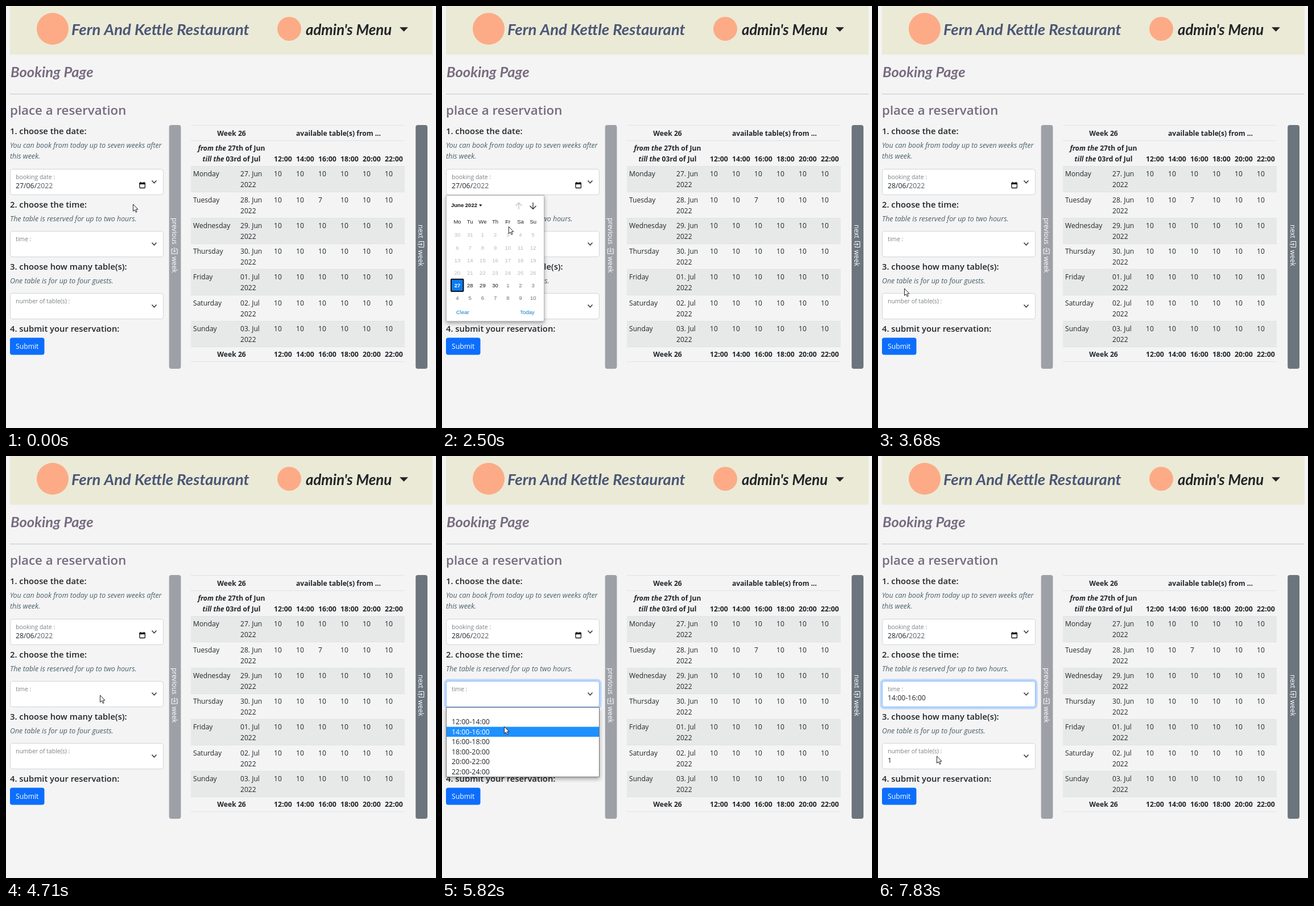
Write an HTML page with a canvas that moves like this. It is 756 px wide and 741 px high and loops after 8000 ms.

```html
<!DOCTYPE html>
<html lang="en">
<head>
<meta charset="utf-8">
<title>Booking Page</title>
<style>
  html, body { margin: 0; width: 100%; height: 100%; overflow: hidden; background: #f4f4f4; }
  canvas { display: block; width: 756px; height: 741px; }
</style>
</head>
<body>
<canvas id="stage" width="756" height="741"></canvas>
<script>
const ctx = document.getElementById('stage').getContext('2d');
const LOOP = 8000;
const UI = '"Open Sans", "Noto Sans", sans-serif';
const TITLE = 'Lato, "Open Sans", sans-serif';
const PICKER = '"Liberation Sans", Arial, sans-serif';
const INK = '#212529', MAUVE = '#776b80', TEAL = '#49606c';
const COLS = [471, 510, 549, 588, 627, 666];
const HOURS = ['12:00', '14:00', '16:00', '18:00', '20:00', '22:00'];
const DAYS = ['Monday', 'Tuesday', 'Wednesday', 'Thursday', 'Friday', 'Saturday', 'Sunday'];

// Moments of the hard changes, in ms
const PICKER_OPEN = 1950, PICKER_CLOSE = 3550, MENU_OPEN = 4850, MENU_CLOSE = 6810;
const CLICKS = [[1880, PICKER_OPEN], [3480, PICKER_CLOSE], [4780, MENU_OPEN], [6680, MENU_CLOSE]];

// Pointer path: time, x, y
const PATH = [
  [540, 223, 348], [760, 236, 330], [980, 249, 315], [1280, 246, 311],
  [1400, 246, 311], [1410, 245, 311], [1600, 245, 312], [1610, 242, 314],
  [2170, 242, 314], [2340, 176, 346], [2500, 117, 387], [2700, 74, 442],
  [2990, 39, 493], [3060, 40, 494], [3280, 46, 496],
  [3690, 46, 496], [3900, 110, 470], [4230, 180, 440], [4500, 165, 420],
  [5080, 165, 420], [5300, 141, 437], [5540, 118, 456], [5820, 109, 475],
  [6800, 109, 475], [6810, 105, 470], [7300, 105, 470], [7560, 99, 496], [7830, 103, 527]
];

function pointerAt(t) {
  const i = PATH.findIndex(k => k[0] > t);
  if (i === 0) return PATH[0].slice(1);
  if (i < 0) return PATH[PATH.length - 1].slice(1);
  const [t0, x0, y0] = PATH[i - 1], [t1, x1, y1] = PATH[i];
  const f = (t - t0) / (t1 - t0);
  return [x0 + (x1 - x0) * f, y0 + (y1 - y0) * f];
}

// Draws one run of text and returns its width
function text(s, x, y, size, color = INK, style = '', align = 'left', family = UI) {
  ctx.font = `${style} ${size}px ${family}`;
  ctx.fillStyle = color;
  ctx.textAlign = align;
  ctx.fillText(s, x, y);
  return ctx.measureText(s).width;
}

function rect(x, y, w, h, color) {
  ctx.fillStyle = color;
  ctx.fillRect(x, y, w, h);
}

function box(x, y, w, h, r, fill, stroke, width = 1) {
  ctx.beginPath();
  ctx.roundRect(x, y, w, h, r);
  if (fill) { ctx.fillStyle = fill; ctx.fill(); }
  if (stroke) { ctx.strokeStyle = stroke; ctx.lineWidth = width; ctx.stroke(); }
}

function line(points, color, width = 1) {
  ctx.beginPath();
  points.forEach(([x, y]) => ctx.lineTo(x, y));
  ctx.strokeStyle = color;
  ctx.lineWidth = width;
  ctx.stroke();
}

function shape(points, color) {
  ctx.beginPath();
  points.forEach(([x, y]) => ctx.lineTo(x, y));
  ctx.closePath();
  ctx.fillStyle = color;
  ctx.fill();
}

function disc(x, y, r, color) {
  ctx.beginPath();
  ctx.arc(x, y, r, 0, Math.PI * 2);
  ctx.fillStyle = color;
  ctx.fill();
}

function panel(x, y, w, h, border) {
  ctx.save();
  ctx.shadowColor = 'rgba(0,0,0,.35)';
  ctx.shadowBlur = 7;
  ctx.shadowOffsetY = 3;
  rect(x, y, w, h, '#fff');
  ctx.restore();
  box(x + .5, y + .5, w - 1, h - 1, 0, null, border);
}

function header() {
  rect(7, 0, 743, 85.5, '#ebead6');
  disc(82, 40, 28, '#fcab86');
  disc(498, 40, 21, '#fcab86');
  text('Fern And Kettle Restaurant', 115, 51, 27.5, '#4a5677', 'italic bold', 'left', TITLE);
  text("admin's Menu", 527, 51, 25.8, INK, 'italic bold', 'left', TITLE);
  shape([[692, 37.3], [707, 37.3], [699.5, 45]], INK);
  text('Booking Page', 8, 125, 25.5, MAUVE, 'italic bold', 'left', TITLE);
  rect(7, 154, 743, 1, '#c6c6c7');
  text('place a reservation', 7, 191, 22.3, MAUVE, '600');
}

function field(y, label, focus) {
  if (focus) box(5.5, y - 1.5, 273, 49, 6, null, '#bcd6fb', 4);
  box(7.5, y + .5, 269, 45, 4, '#fff', focus ? '#86b7fe' : '#d0d4d8');
  text(label, 17, y + 18, 10.45, '#7c8186');
  line([[256.5, y + 20.5], [260.5, y + 24.8], [264.5, y + 20.5]], '#343a40', 1.5);
}

function form(t) {
  text('1. choose the date:', 7, 225, 14.8, INK, '600');
  text('You can book from today up to seven weeks after', 7, 249, 12.4, TEAL, 'italic');
  text('this week.', 7, 268, 12.4, TEAL, 'italic');
  field(286, 'booking date :');
  const w = text(t < PICKER_CLOSE ? '27/06/' : '28/06/', 17, 320, 12.3);
  text('2022', 17 + w, 320, 12.3, '#5c6166');
  box(235, 310.7, 9.4, 8.8, 1, null, '#111', 1.3);
  rect(234.5, 310, 10.4, 3.2, '#111');
  rect(236.2, 308.8, 1.4, 2, '#111');
  rect(241.8, 308.8, 1.4, 2, '#111');

  text('2. choose the time:', 7, 354, 14.8, INK, '600');
  text('The table is reserved for up to two hours.', 7, 378, 12.4, TEAL, 'italic');
  field(395, 'time :', t >= MENU_OPEN);

  text('3. choose how many table(s):', 7, 463, 14.8, INK, '600');
  text('One table is for up to four guests.', 7, 487, 12.4, TEAL, 'italic');
  field(504, 'number of table(s) :');
  if (t >= MENU_CLOSE) {
    text('14:00-16:00', 17, 429, 12.3);
    text('1', 17, 539, 12.3);
  }

  text('4. submit your reservation:', 7, 572, 14.8, INK, '600');
  box(7, 582.5, 60.5, 30, 4, '#0d6efd');
  text('Submit', 17, 602, 12.2, '#fff');
}

function weekBar(x, color, ink, first, top, iconY, dir) {
  box(x, 209, 20.8, 428, 4, color);
  [[first, top], ['week', iconY + 16]].forEach(([s, y]) => {
    ctx.save();
    ctx.translate(x + 5, y);
    ctx.rotate(Math.PI / 2);
    text(s, 0, 0, 11.7, ink);
    ctx.restore();
  });
  // Box with an arrow going in
  ctx.save();
  ctx.translate(x + 9.5, iconY + 6);
  ctx.rotate(dir);
  line([[-3.5, -2.5], [-3.5, -5], [5, -5], [5, 5], [-3.5, 5], [-3.5, 2.5]], ink);
  line([[-6, 0], [2, 0]], ink);
  line([[-.5, -2.5], [2, 0], [-.5, 2.5]], ink);
  ctx.restore();
}

function hourRow(y) {
  HOURS.forEach((h, i) => text(h, COLS[i], y, 12.4, INK, 'bold'));
}

// An italic lead and a plain date, centred together
function span(lead, date, y) {
  ctx.font = `italic bold 12.1px ${UI}`;
  const a = ctx.measureText(lead + ' ').width;
  ctx.font = `bold 12.1px ${UI}`;
  const x = 396.5 - (a + ctx.measureText(date).width) / 2;
  text(lead, x, y, 12.1, INK, 'italic bold');
  text(date, x + a, y, 12.1, INK, 'bold');
}

function table() {
  const rule = y => rect(325, y, 376, 1, '#dfe2e5');
  rule(209);
  rule(236);
  text('Week 26', 396.5, 228, 12.2, INK, 'bold', 'center');
  text('available table(s) from ...', 584.5, 228, 12.1, INK, 'bold', 'center');
  span('from the', '27th of Jun', 254);
  span('till the', '03rd of Jul', 273);
  hourRow(273);
  DAYS.forEach((day, i) => {
    const top = 281 + i * 45.25, y = top + 18.3;
    if (i % 2 === 0) rect(325, Math.round(top), 376, 45, '#e7e9e8');
    rule(Math.round(top));
    const date = (27 + i - 1) % 30 + 1;
    text(day, 329, y, 12.1);
    text(`${String(date).padStart(2, '0')}. ${i < 4 ? 'Jun' : 'Jul'}`, 412, y, 12.1);
    text('2022', 412, y + 19, 12.1);
    COLS.forEach((x, c) => text(i === 1 && c === 2 ? '7' : '10', x, y, 12.1));
  });
  rule(598);
  text('Week 26', 396.5, 616, 12.2, INK, 'bold', 'center');
  hourRow(616);
  rule(624);
}

function arrow(x, dir, color) {
  line([[x, 351 - 6 * dir], [x, 351 + 5.5 * dir]], color, 1.2);
  line([[x - 5.5, 351], [x, 351 + 5.5 * dir], [x + 5.5, 351]], color, 1.2);
}

function picker() {
  const put = (s, x, y, color, style, align = 'center') =>
    text(s, x, y, 9.5, color, style, align, PICKER);
  panel(7, 332, 173, 222, '#b5b5b5');
  put('June 2022', 16, 353, '#111', 'bold', 'left');
  shape([[65, 348.5], [70.5, 348.5], [67.75, 352]], '#111');
  arrow(135, -1, '#bdbdbd');
  arrow(160, 1, '#222');
  ['Mo', 'Tu', 'We', 'Th', 'Fr', 'Sa', 'Su'].forEach((d, i) => put(d, 27 + i * 22.2, 382, '#222'));
  box(16, 479.8, 21.5, 21.2, 1, '#0b7bf5', '#101010', 2);
  for (let n = 0; n < 42; n++) {
    const offset = n - 1;
    const day = n < 2 ? 30 + n : offset <= 30 ? offset : offset - 30;
    const color = n < 28 ? '#b9b9b9' : n === 28 ? '#fff' : n < 32 ? '#111' : '#6c6c6c';
    put(day, 27 + n % 7 * 22.2, 405.3 + Math.floor(n / 7) * 22.2, color, n === 28 ? 'bold' : '');
  }
  put('Clear', 25, 541, '#0a7bcb', '', 'left');
  put('Today', 162.5, 541, '#0a7bcb', '', 'right');
}

function menu(y) {
  panel(7, 441, 270, 123, '#777');
  const over = y < 458 ? -1 : y < 474 ? 0 : 1;
  if (over < 0) rect(8, 442, 268, 16, '#c8c8c8');
  HOURS.forEach((h, i) => {
    const on = i === over;
    if (on) rect(8, 458 + i * 17.5, 268, 17.5, '#1e90ff');
    text(`${h}-${14 + i * 2}:00`, 17, 471.3 + i * 17.45, 12.3, on ? '#fff' : INK);
  });
}

function pointer(x, y) {
  ctx.save();
  ctx.translate(x + .5, y);
  ctx.lineJoin = 'round';
  ctx.beginPath();
  [[0, 0], [0, 12.4], [2.8, 9.8], [4.8, 14.3], [6.7, 13.4], [4.8, 9.1], [8.5, 9.1]]
    .forEach(([px, py]) => ctx.lineTo(px, py));
  ctx.closePath();
  ctx.fillStyle = '#fff';
  ctx.fill();
  ctx.strokeStyle = '#222';
  ctx.lineWidth = 1;
  ctx.stroke();
  ctx.restore();
}

function draw(t) {
  const [x, y] = pointerAt(t);
  rect(0, 0, 756, 741, '#f4f4f4');
  header();
  form(t);
  weekBar(286.7, '#9da1a7', '#fff', 'previous', 372, 424, Math.PI / 2);
  weekBar(720.2, '#6c757d', '#fff', 'next', 384, 412.5, 0);
  table();
  if (t >= PICKER_OPEN && t < PICKER_CLOSE) picker();
  if (t >= MENU_OPEN && t < MENU_CLOSE) menu(y);
  if (CLICKS.some(([from, to]) => t >= from && t < to)) disc(x - .5, y + .5, 9.7, 'rgba(236,236,40,.68)');
  pointer(x, y);
}

const start = performance.now();
function tick() {
  draw((performance.now() - start) % LOOP);
  requestAnimationFrame(tick);
}
tick();
</script>
</body>
</html>
```
